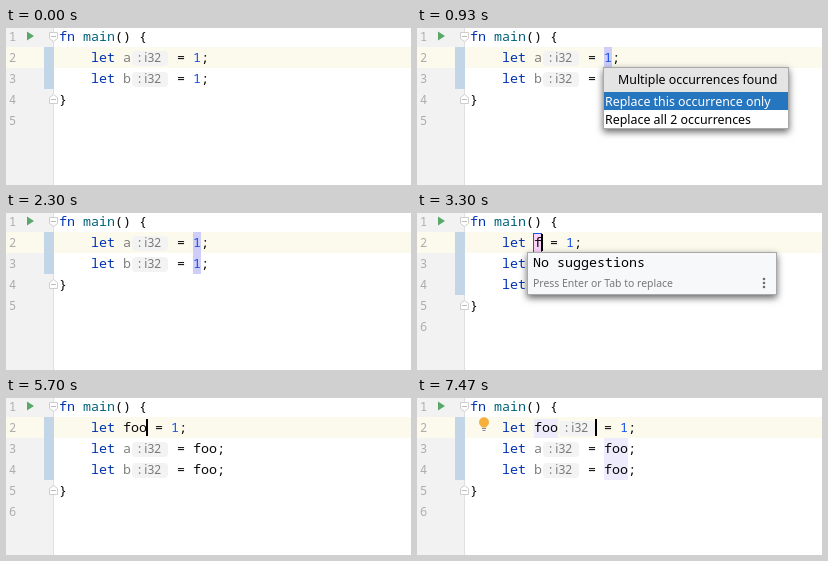
Animation of 405x157 px, one loop 7.51 s. Source, as an HTML page with a canvas:

```html
<!DOCTYPE html>
<html lang="en">
<head>
<meta charset="utf-8">
<title>Extract variable</title>
<style>
html, body { margin: 0; width: 100%; height: 100%; overflow: hidden; background: #fff; }
canvas { display: block; }
</style>
</head>
<body>
<canvas id="stage" width="405" height="157"></canvas>
<script>
const LOOP = 7510;
const mono = size => `${size}px "Noto Sans Mono", "DejaVu Sans Mono", monospace`;
const sans = size => `${size}px "Noto Sans", "Open Sans", sans-serif`;
const CODE = mono(13.33);
const BLUE = '#0033b3', NUM = '#1750eb', TEAL = '#00627a', INK = '#080808', GRAY = '#808080';
const CHAR = 8, ROW = 21, HINT = 38;
const ctx = document.getElementById('stage').getContext('2d');

const rowTop = row => 19 + (row - 2) * ROW;
const baseline = row => 13 + (row - 1) * ROW;

function rect(x, y, w, h, color) {
  ctx.fillStyle = color;
  ctx.fillRect(x, y, w, h);
}

function text(str, x, y, color, font = CODE) {
  ctx.font = font;
  ctx.fillStyle = color;
  ctx.fillText(str, x, y);
}

function shape(points, fill, stroke) {
  ctx.beginPath();
  points.forEach(([x, y]) => ctx.lineTo(x, y));
  ctx.closePath();
  ctx.fillStyle = fill;
  ctx.fill();
  if (stroke) {
    ctx.strokeStyle = stroke;
    ctx.lineWidth = 1;
    ctx.stroke();
  }
}

function disc(x, y, r, color) {
  ctx.beginPath();
  ctx.arc(x, y, r, 0, Math.PI * 2);
  ctx.fillStyle = color;
  ctx.fill();
}

function hint(x, row) {
  ctx.beginPath();
  ctx.roundRect(x + 1, rowTop(row) + 4, HINT - 2, 15, 4);
  ctx.fillStyle = '#f3f3f3';
  ctx.fill();
  text(': i32', x + 7, baseline(row), '#7a7a7a', sans(12));
}

// Parts are [text, colour], or null for a type hint.
function line(row, x, ...parts) {
  for (const part of parts) {
    if (part) {
      text(part[0], x, baseline(row), part[1]);
      x += part[0].length * CHAR;
    } else {
      hint(x, row);
      x += HINT;
    }
  }
}

function foldMark(row, dir) {
  const y = baseline(row) - 4.5;
  const pts = [[-4, -4], [4, -4], [4, 2], [0, 5], [-4, 2]];
  shape(pts.map(([px, py]) => [47.5 + px, y + py * dir]), '#fff', '#cecece');
  rect(45, y - .5, 5, 1, '#bcbcbc');
}

function gutter(rows) {
  rect(0, 0, 47, 157, '#f2f2f2');
  rect(47, 0, 1, 157, '#e0e0e0');
  rect(0, 19, 405, ROW, '#fcfaed');
  rect(38, 19, 10, (rows - 3) * ROW, '#c3d6e8');
  for (let i = 1; i <= rows; i++) text(i, 3, baseline(i), '#adadad', mono(12));
  shape([[21, 3.5], [28, 8], [21, 12.5]], '#59a869');
  foldMark(1, 1);
  foldMark(rows - 1, -1);
}

function panel(x, y, w, h, fill) {
  ctx.save();
  ctx.shadowColor = 'rgba(0,0,0,.6)';
  ctx.shadowBlur = 7;
  ctx.shadowOffsetY = 3;
  rect(x, y, w, h, '#a9a9a9');
  ctx.restore();
  rect(x + 1, y + 1, w - 2, h - 2, fill);
}

function chooser(picked) {
  panel(186, 39, 186, 62, '#fff');
  rect(187, 40, 184, 24, '#e4e4e4');
  text('Multiple occurrences found', 201, 56, '#000', sans(12.4));
  rect(187, 64 + picked * 18, 184, 18, '#2675bf');
  ['Replace this occurrence only', 'Replace all 2 occurrences'].forEach((label, i) =>
    text(label, 188, 78 + i * 18, i === picked ? '#fff' : '#000', sans(12.4)));
}

function lookup(label) {
  panel(110, 39, 250, 43, '#f7f8fa');
  text(label, 116, 54, '#000');
  text('Press Enter or Tab to replace', 116, 74, '#787878', sans(10.45));
  for (const y of [66, 70, 74]) disc(347, y, 1.3, '#6e6e6e');
}

function bulb() {
  disc(67, 24.3, 5, '#f4af3d');
  rect(64.5, 27, 5, 2.5, '#f4af3d');
  rect(65, 30, 4, 1, '#7f8b91');
  rect(65.5, 32, 3, 1, '#7f8b91');
}

function nameField(name, selected) {
  const w = name.length * CHAR;
  rect(117, 20, w, 20, selected ? '#a6d2ff' : '#fbd3fb');
  ctx.strokeStyle = '#1f55e6';
  ctx.lineWidth = 1;
  ctx.strokeRect(116.5, 20.5, w, 19);
}

const caret = x => rect(x - 1, 21, 2, 17, '#000');

function before(t) {
  gutter(5);
  if (t >= 930) rect(187, 19, CHAR, t < 2300 ? ROW : 2 * ROW, '#cfcefb');
  ['a', 'b'].forEach((name, i) =>
    line(2 + i, 85, ['let ', BLUE], [name, GRAY], null, [' = ', INK], ['1', NUM], [';', INK]));
  if (t >= 130 && t < 600) caret(187);
  if (t >= 930 && t < 2300) chooser(t < 1870 ? 0 : 1);
}

function after(t) {
  const editing = t < 5670, settled = t >= 6070;
  const name = t < 3300 ? 'i' : 'foo'.slice(0, t < 3700 ? 1 : t < 3930 ? 2 : 3);
  const end = 117 + name.length * CHAR;
  gutter(6);
  if (editing) nameField(name, t < 3300);
  if (settled) {
    rect(117, 21, 24, 19, '#edebfc');
    rect(187, 40, 24, 2 * ROW, '#edebfc');
  }
  const hints = settled ? [null] : [];
  line(2, 85, ['let ', BLUE], [name, INK], ...hints, [' = ', INK], ['1', NUM], [';', INK]);
  ['a', 'b'].forEach((v, i) =>
    line(3 + i, 85, ['let ', BLUE], [v, GRAY], null, [` = ${name};`, INK]));
  if (t < 5100 || (t >= 5700 && t < 6970) || t >= 7470) caret(settled ? end + HINT : end);
  if (editing) lookup(t < 3300 ? 'i' : 'No suggestions');
  if (t >= 6600) bulb();
}

function draw(t) {
  rect(0, 0, 405, 157, '#fff');
  const edited = t >= 2400;
  (edited ? after : before)(t);
  line(1, 53, ['fn ', BLUE], ['main', TEAL], ['() {', INK]);
  line(edited ? 5 : 4, 53, ['}', INK]);
}

const start = performance.now();
function tick() {
  draw((performance.now() - start) % LOOP);
  requestAnimationFrame(tick);
}
tick();
</script>
</body>
</html>
```
